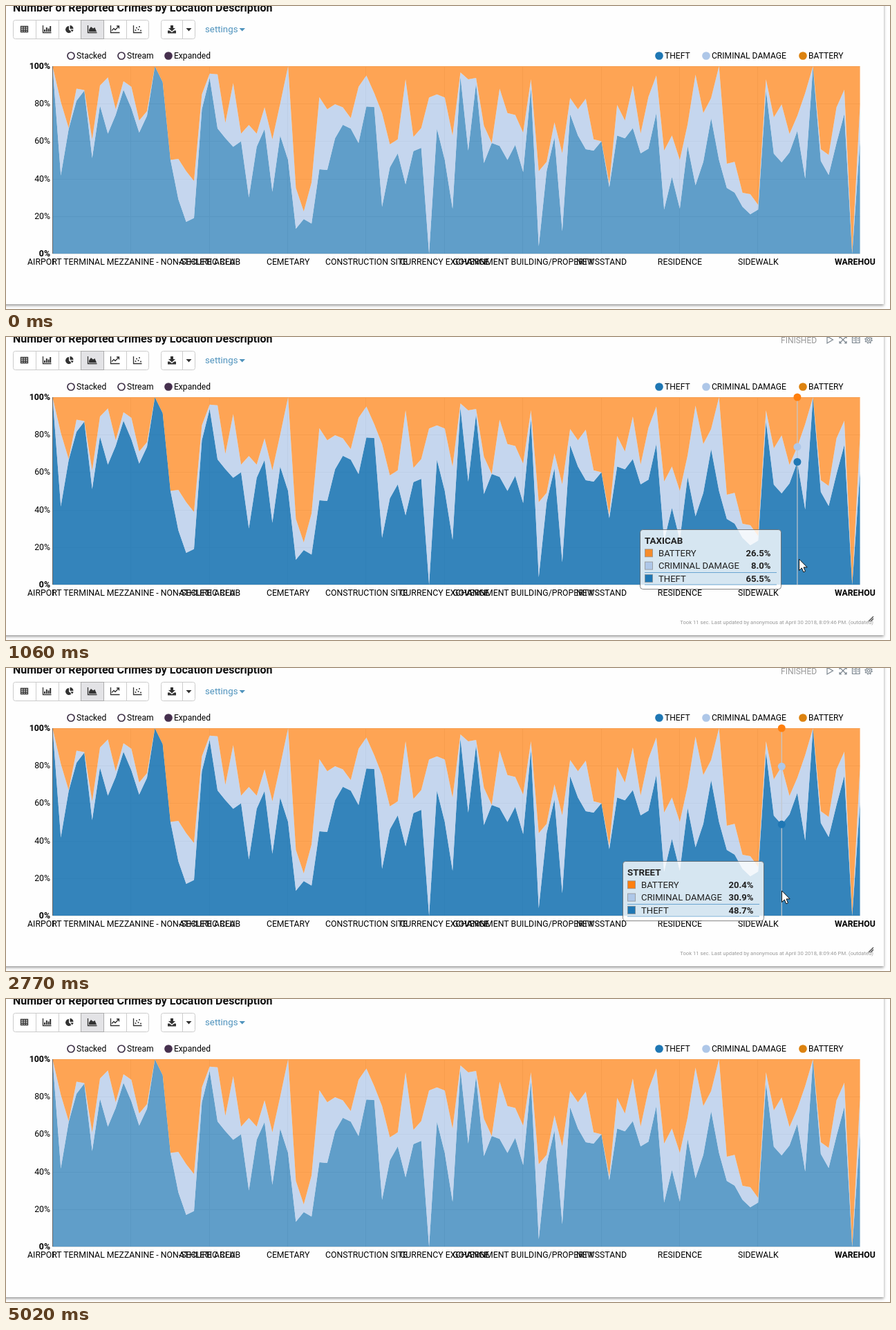
These frames come from a looping animation (1279x438 px, 5640 ms). An HTML page:

```html
<!DOCTYPE html>
<html lang="en">
<head>
<meta charset="utf-8">
<title>Area chart</title>
<style>
html, body { margin: 0; width: 100%; height: 100%; overflow: hidden; background: #fff; }
svg { display: block; position: absolute; left: 0; top: 0; font: 12.3px Roboto, Arial, sans-serif; }
.card { position: absolute; left: -10px; top: -20px; width: 1280px; height: 451px; background: #fefefe; box-shadow: 0 2px 4px rgba(0,0,0,.42); }
.b { font-weight: 700; }
.mid { text-anchor: middle; }
.end { text-anchor: end; }
.btn { fill: #fff; stroke: #ccc; }
.ico { fill: #333; }
.line { fill: none; stroke: #333; stroke-width: 1.3; }
</style>
</head>
<body>
<div class="card"></div>
<svg id="stage" width="1279" height="438" viewBox="0 0 1279 438">
  <defs><clipPath id="clip"><rect width="1258" height="438"/></clipPath></defs>
  <text class="b" x="10" y="8" font-size="16" fill="#111">Number of Reported Crimes by Location Description</text>

  <g id="bar">
    <rect class="btn" x="10.5" y="20.5" width="196" height="27" rx="3"/>
    <path d="M43.5 21v26M76.5 21v26M174.5 21v26" stroke="#ccc"/>
    <rect x="108.5" y="20.5" width="33" height="27" fill="#e3e3e6" stroke="#adadad"/>
    <rect class="btn" x="224.5" y="20.5" width="49" height="27" rx="3"/>
    <path d="M255.5 21v26" stroke="#ccc"/>
    <path class="line" stroke-width="1" d="M21.5 29.5h10v8h-10zM21.5 32.2h10M21.5 35h10M25 29v8M28.300 29v8"/>
    <path class="line" stroke-width="1" d="M53.500 28v10.500h12"/>
    <path class="ico" d="M55 34h2v3h-2zM57.800 31h2v6h-2zM60.600 32.500h2v4.500h-2zM63.200 29h2v8h-2z"/>
    <path class="ico" d="M91 29v5l3.600 3.600A5 5 0 1 1 91 29zM92.500 28a5 5 0 0 1 5 5h-5zM93 34.300h4.500a5 5 0 0 1 -1.500 3z"/>
    <path class="line" d="M118.500 28v10.500h13"/>
    <path class="ico" d="M120 37v-3l3-4 3 2.500 2.500 -1.500 2.500 6z"/>
    <path class="line" d="M151.500 28v10.500h13M153 35.500l3-3 2 2 5-5M160 29h3.500v3.500"/>
    <path class="line" stroke-width="1" d="M184.500 28v10.500h12"/>
    <g class="ico"><circle cx="187.500" cy="35" r="1"/><circle cx="189" cy="31.500" r="1"/><circle cx="191.500" cy="34" r="1"/><circle cx="193" cy="30" r="1"/><circle cx="195" cy="35.500" r="1"/></g>
    <path class="ico" d="M238 28h4v4h3l-5 4.500-5-4.500h3zM234 35.500h2.500l3.500 2.500 3.500-2.500h2.500v4h-12zM260.500 32h8l-4 4.500z"/>
    <text x="288" y="38" font-size="13.3" fill="#4f93bd">settings</text>
    <path d="M337.500 32h8.500l-4.250 4.500z" fill="#4f93bd"/>
  </g>

  <g id="legend"></g>
  <g id="grid" stroke="#e5e5e5"></g>
  <path id="theft" fill="#1f77b4"/>
  <path id="damage" fill="#aec7e8" fill-opacity=".7"/>
  <path id="battery" fill="#ff7f0e" fill-opacity=".7"/>
  <path d="M67.500 87v271" stroke="#000" stroke-opacity=".6"/>
  <g id="labels" clip-path="url(#clip)"></g>

  <g id="extras">
    <text x="1121" y="8.500" font-size="12" fill="#999">FINISHED</text>
    <g fill="none" stroke="#7d8790" stroke-width="1.2">
      <path d="M1188 -1l8.500 5-8.500 5z"/>
      <path d="M1206 2v-3h3M1213 -1h3v3M1216 6v3h-3M1209 9h-3v-3M1206 -1l10 10M1216 -1l-10 10"/>
      <path d="M1224.500 0h10.500v8.500h-10.500zM1229.750 0v9M1226 2.500h2.500M1226 5h2.500M1231.500 2.500h2.500M1231.500 5h2.500"/>
      <circle cx="1248" cy="4" r="1.800"/>
      <circle cx="1248" cy="4" r="4"/>
      <circle cx="1248" cy="4" r="5.200" stroke-dasharray="2 2.080"/>
    </g>
    <text class="end" x="1255" y="415" font-size="7.700" fill="#999">Took 11 sec. Last updated by anonymous at April 30 2018, 8:09:46 PM. (outdated)</text>
    <path d="M1248 411l7-7M1251 411l4-4" stroke="#444" stroke-width="1.200"/>
  </g>

  <g id="guide">
    <path d="M0 87v271" stroke="#c4c8cc" stroke-width="1.200"/>
    <circle r="5.500" fill="#ff7f0e"/>
    <circle r="5.500" fill="#aec7e8"/>
    <circle r="5.500" fill="#1f77b4"/>
  </g>
  <g id="tip"></g>
  <path id="cursor" d="M0 0v16.500l3.800-3.600 2.500 5.900 2.700-1.200-2.500-5.700h5.200z" fill="#fff" stroke="#111"/>
</svg>
<script>
const LOOP = 5640, LEFT = 68, GAP = 11.336, TOP = 87, BASE = 358;
const $ = id => document.getElementById(id);
const px = i => LEFT + i * GAP;
const py = p => BASE - (BASE - TOP) * p / 100;

// percent of thefts, then percent of thefts plus damage, per location
const theft = [
  97, 41.7, 66.5, 81.5, 87, 51, 79, 64, 74, 87.5, 77.5, 64.6, 73.5, 100, 91.5, 50, 29, 17, 19, 77,
  93.7, 66.8, 61.6, 57, 60, 30, 57, 66.5, 33, 63, 50, 13.3, 18.5, 16, 45, 44.6, 61.5, 68.7, 66.7, 59,
  78.5, 78.2, 25, 46, 53.5, 37, 54.7, 56.5, 0, 66.7, 50, 24, 94.5, 55, 91, 48.3, 59, 57.5, 50, 58,
  43.5, 88.5, 4, 44, 62, 12, 74.3, 63, 55.7, 55, 60, 35.5, 63, 61.5, 67, 53.5, 56, 75, 23.5, 41,
  24, 57.5, 36.5, 49, 72.3, 50, 35, 32.6, 25, 21, 23.5, 87, 53.3, 48.7, 54, 65.5, 40, 100, 49.5, 42,
  59, 74.5, 0, 60];
const both = [
  99, 81, 67, 88, 87.3, 61, 89.7, 94, 77, 92, 89, 71, 76, 100, 91.5, 50, 50.5, 44, 38.7, 85,
  96, 95.7, 69.7, 91, 64, 68.6, 64, 78, 61, 80, 100, 35, 22.5, 38, 83.5, 77, 79.7, 78, 72.3, 89,
  95, 85.6, 75, 58.3, 61, 93, 62.3, 67, 83.3, 85, 83.3, 63, 96.7, 93, 93.7, 68.3, 59, 88, 75, 74,
  64.6, 93, 44, 49, 70, 53.5, 83, 77, 82.7, 61, 60, 37.5, 79.3, 71, 89.7, 64, 83.7, 95, 55, 63,
  50, 69, 95.5, 75, 83, 100, 48, 49, 32.5, 31.7, 26, 93, 72.7, 79.6, 63.8, 73.5, 85.7, 100, 55.7, 52.7,
  78, 87.5, 0.5, 79];

function band(low, high) {
  const pt = (p, i) => px(i).toFixed(1) + ' ' + py(p).toFixed(1);
  return 'M' + [...high.map(pt), ...low.map(pt).reverse()].join('L') + 'Z';
}
const flat = p => theft.map(() => p);
$('theft').setAttribute('d', band(flat(0), theft));
$('damage').setAttribute('d', band(theft, both));
$('battery').setAttribute('d', band(both, flat(100)));

const text = (x, y, s, cls = '', more = '') => `<text x="${x}" y="${y}" class="${cls}" ${more}>${s}</text>`;

const names = ['AIRPORT TERMINAL MEZZANINE - NON-SECURE AREA', 'ATHLETIC CLUB', 'CEMETARY',
  'CONSTRUCTION SITE', 'CURRENCY EXCHANGE', 'GOVERNMENT BUILDING/PROPERTY', 'NEWSSTAND',
  'RESIDENCE', 'SIDEWALK'];
let grid = '', labels = '';
names.forEach((s, k) => {
  const x = px(10 * k + 10);
  grid += `<path d="M${Math.round(x) - .5} ${TOP}V${BASE}"/>`;
  labels += text(x, 374, s, 'mid');
});
for (let p = 0; p <= 100; p += 20) {
  const y = py(p);
  grid += `<path d="M${LEFT} ${Math.round(y) + .5}H${px(103)}"/>`;
  labels += text(64, y + 4, p + '%', p % 100 ? 'end' : 'end b');
}
labels += text(LEFT, 374, 'I', 'mid b') + text(px(103), 374, 'WAREHOUSE', 'mid b');
$('grid').innerHTML = grid;
$('labels').innerHTML = labels;

$('legend').innerHTML = [
  [94, 'Stacked', '#fff', '#3f3148'], [167, 'Stream', '#fff', '#3f3148'], [235, 'Expanded', '#46304e', '#46304e'],
  [945, 'THEFT', '#1f77b4', '#1f77b4'], [1013, 'CRIMINAL DAMAGE', '#aec7e8', '#aec7e8'], [1153, 'BATTERY', '#dc820f', '#dc820f']
].map(([x, s, fill, edge]) =>
  `<circle cx="${x}" cy="72" r="5" fill="${fill}" stroke="${edge}" stroke-width="1.700"/>` +
  text(x + 8, 76, s, '', 'font-size="12.100"')).join('');

// hovered location: title, values, box width, swatch tint
const spots = {
  97: ['VEHICLE - DELIVERY TRUCK', ['0.0%', '0.0%', '100.0%'], 214, '#cf8647'],
  96: ['VACANT LOT', ['14.3%', '45.7%', '40.0%'], 205, '#e08a3a'],
  95: ['TAXICAB', ['26.5%', '8.0%', '65.5%'], 205, '#f58c2c'],
  94: ['TAVERN/LIQUOR STORE', ['36.1%', '9.8%', '54.0%'], 205, '#fb8a20'],
  93: ['STREET', ['20.4%', '30.9%', '48.7%'], 205, '#ff7f0e']
};
function tipMarkup(i) {
  const [title, values, w, tint] = spots[i];
  const tints = [tint, '#aec7e8', '#1f77b4'];
  const rows = ['BATTERY', 'CRIMINAL DAMAGE', 'THEFT'].map((s, k) => {
    const y = 34.300 + 18.300 * k;
    return `<rect x="7.500" y="${y - 5.500}" width="11" height="11" fill="${tints[k]}" stroke="#888" stroke-opacity=".7"/>` +
      text(27, y + 4.700, s) + text(w - 15.500, y + 4.700, values[k], 'end b');
  }).join('');
  return `<rect x=".5" y=".5" width="${w - 1}" height="86" rx="4" fill="#fff" fill-opacity=".8" stroke="#555" stroke-opacity=".7"/>` +
    `<path d="M7 62.500H${w - 7}M7 80H${w - 7}" stroke="#5e9fcf" stroke-width=".9"/>` +
    `<g font-size="13.100" fill="#222">${text(7, 21, title, 'b', 'font-size="13.400"')}${rows}</g>`;
}

// the screen refreshes only at these times
const ticks = [0, 610, 670, 750, 830, 900, 980, 1060, 1850, 1930, 2000, 2080, 2460, 2540, 2620, 2690, 2770,
  4330, 4390, 4470, 4540, 4620, 4700, 4770, 4850, 4940, 5020];

const cursorPath = [[610, 1188, 384], [670, 1163.5, 341], [750, 1158, 333], [900, 1150, 324], [1060, 1147.5, 321],
  [1850, 1145, 321], [2080, 1136, 321], [2460, 1133, 321], [2770, 1122.5, 322],
  [4330, 1130.5, 340], [4390, 1145, 366], [4470, 1164, 377], [4540, 1186, 391],
  [4620, 1197, 397], [4700, 1222, 414], [4770, 1240, 428], [4850, 1262, 445]];
const tipPath = [[670, 925, 297], [1060, 917, 278], [1850, 914, 278], [2080, 905, 279], [2460, 902, 279],
  [2770, 892, 279], [4330, 894, 285], [4390, 896, 288]];
const shade = [[640, .7], [670, .73], [900, .9], [4390, .9], [4640, .7]];
const tipFade = [[610, 0], [670, 1], [4390, 1], [4600, 0]];
const spotAt = [[610, 97], [750, 96], [830, 95], [2000, 94], [2620, 93]];

function at(table, t) {
  const k = table.findIndex(r => r[0] > t);
  if (k === 0) return table[0].slice(1);
  if (k < 0) return table[table.length - 1].slice(1);
  const a = table[k - 1], b = table[k], u = (t - a[0]) / (b[0] - a[0]);
  return a.slice(1).map((v, j) => v + (b[j + 1] - v) * u);
}
const move = (el, x, y) => el.setAttribute('transform', `translate(${x} ${y})`);
const show = (el, on) => el.setAttribute('opacity', +on);
const dots = [...$('guide').querySelectorAll('circle')];
let shown = 0;

function draw(now) {
  const time = now % LOOP;
  const t = ticks.filter(v => v <= time).pop();
  const spot = spotAt.filter(r => r[0] <= t).pop()?.[1] ?? 97;
  if (spot !== shown) {
    $('tip').innerHTML = tipMarkup(spot);
    [100, both[spot], theft[spot]].forEach((p, k) => dots[k].setAttribute('cy', py(p)));
    move($('guide'), px(spot), 0);
    shown = spot;
  }
  show($('extras'), t >= 610 && t < 4940);
  show($('guide'), t >= 670 && t < 4390);
  show($('tip'), at(tipFade, t)[0]);
  show($('cursor'), t >= 610 && t < 4850);
  move($('tip'), ...at(tipPath, t).map(Math.round));
  move($('cursor'), ...at(cursorPath, t));
  $('theft').setAttribute('fill-opacity', at(shade, t)[0]);
}
const start = performance.now();
function frame() {
  draw(performance.now() - start);
  requestAnimationFrame(frame);
}
frame();
</script>
</body>
</html>
```
